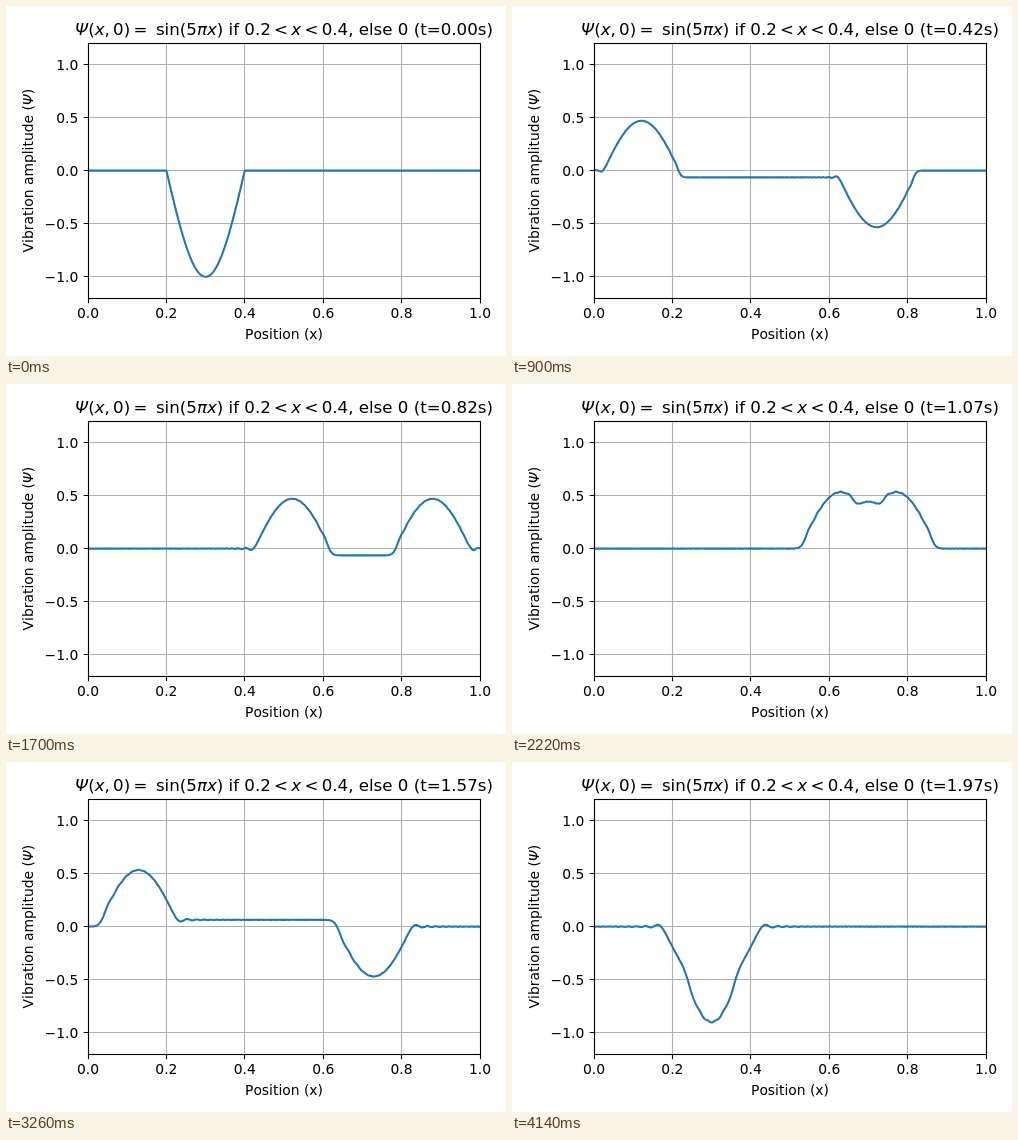
Recreate the animation shown at these times as an HTML page. Size 500 by 350 pixels, loop 4160 ms.

```html
<!DOCTYPE html>
<html lang="en">
<head>
<meta charset="utf-8">
<title>Vibrating string</title>
<style>
html, body { margin: 0; width: 100%; height: 100%; overflow: hidden; background: #fff; }
svg { display: block; }
text { font: 13.889px "DejaVu Sans", sans-serif; font-kerning: none; white-space: pre; }
.title { font-size: 16.667px; }
.i { font-style: italic; }
</style>
</head>
<body>
<svg width="500" height="350" viewBox="0 0 500 350">
  <path id="grid" stroke="#b0b0b0" stroke-width="1.11"/>
  <path id="ticks" stroke="#000" stroke-width="1.11"/>
  <path id="wave" fill="none" stroke="#1f77b4" stroke-width="2.083" stroke-linejoin="round"/>
  <rect x="82.5" y="37.5" width="392" height="255" fill="none" stroke="#000" stroke-width="1.11"/>
  <g id="labels"></g>
  <text x="278" y="333" text-anchor="middle">Position (x)</text>
  <text transform="translate(27 164.6) rotate(-90)" text-anchor="middle">Vibration amplitude (<tspan class="i">Ψ</tspan>)</text>
  <text class="title" x="69" y="29"><tspan class="i">Ψ</tspan>(<tspan class="i">x</tspan>,<tspan dx="3.25">0)</tspan><tspan dx="3.25">=</tspan><tspan dx="3.25"> sin(5</tspan><tspan class="i">πx</tspan>) if 0.2<tspan dx="3.25">&lt;</tspan><tspan class="i" dx="3.25">x</tspan><tspan dx="3.25">&lt;</tspan><tspan dx="3.25">0.4, else 0 (t=</tspan><tspan id="time">0.00</tspan>s)</text>
</svg>
<script>
const $ = id => document.getElementById(id);
const px = x => 82 + 392 * x;
const py = y => 164.6 - 106.2 * y;
const snap = v => Math.floor(v) + 0.5;

// Axes
let grid = '', ticks = '', labels = '';
for (let i = 0; i <= 5; i++) {
  const x = px(i / 5);
  grid += `M${snap(x)} 37.5V292.5`;
  ticks += `M${snap(x)} 292.5v4.86`;
  labels += `<text x="${x}" y="312" text-anchor="middle">${(i / 5).toFixed(1)}</text>`;
}
for (let i = -2; i <= 2; i++) {
  const y = py(i / 2);
  grid += `M82.5 ${snap(y)}H474.5`;
  ticks += `M82.5 ${snap(y)}h-4.86`;
  labels += `<text x="72.3" y="${snap(y) + 5}" text-anchor="end">${(i / 2).toFixed(1).replace('-', '−')}</text>`;
}
$('grid').setAttribute('d', grid);
$('ticks').setAttribute('d', ticks);
$('labels').innerHTML = labels;

// Wave equation by central differences: fixed ends, initial velocity equal to the initial shape
const N = 500, DT = 0.001, C2 = (DT * N) ** 2, FRAMES = 80, STEPS = 25;
const bend = (u, i) => i && i < N ? C2 * (u[i - 1] - 2 * u[i] + u[i + 1]) : 0;
const toPath = u => 'M' + Array.from(u, (y, i) => `${px(i / N).toFixed(2)} ${py(y).toFixed(2)}`).join('L');

let prev = Float64Array.from({ length: N + 1 }, (_, i) =>
  i > 0.2 * N && i < 0.4 * N ? Math.sin(5 * Math.PI * i / N) : 0);
let cur = prev.map((y, i) => y + DT * y + bend(prev, i) / 2);
const paths = [];
for (let n = 0; n < FRAMES; n++) {
  paths.push(toPath(prev));
  for (let s = 0; s < STEPS; s++) {
    const next = cur.map((y, i) => 2 * y - prev[i] + bend(cur, i));
    prev = cur;
    cur = next;
  }
}

// Pictures stay 20, 100, 20, 100, 20 ms in turn
const STARTS = [0, 20, 120, 140, 240], GROUP = 260, LOOP = 4160;
const t0 = performance.now();
function draw() {
  const ms = Math.max(0, performance.now() - t0) % LOOP;
  const n = 5 * Math.floor(ms / GROUP) + STARTS.filter(s => s <= ms % GROUP).length - 1;
  $('wave').setAttribute('d', paths[n]);
  $('time').textContent = (Math.floor(n * 2.5) / 100).toFixed(2);
  requestAnimationFrame(draw);
}
draw();
</script>
</body>
</html>
```
